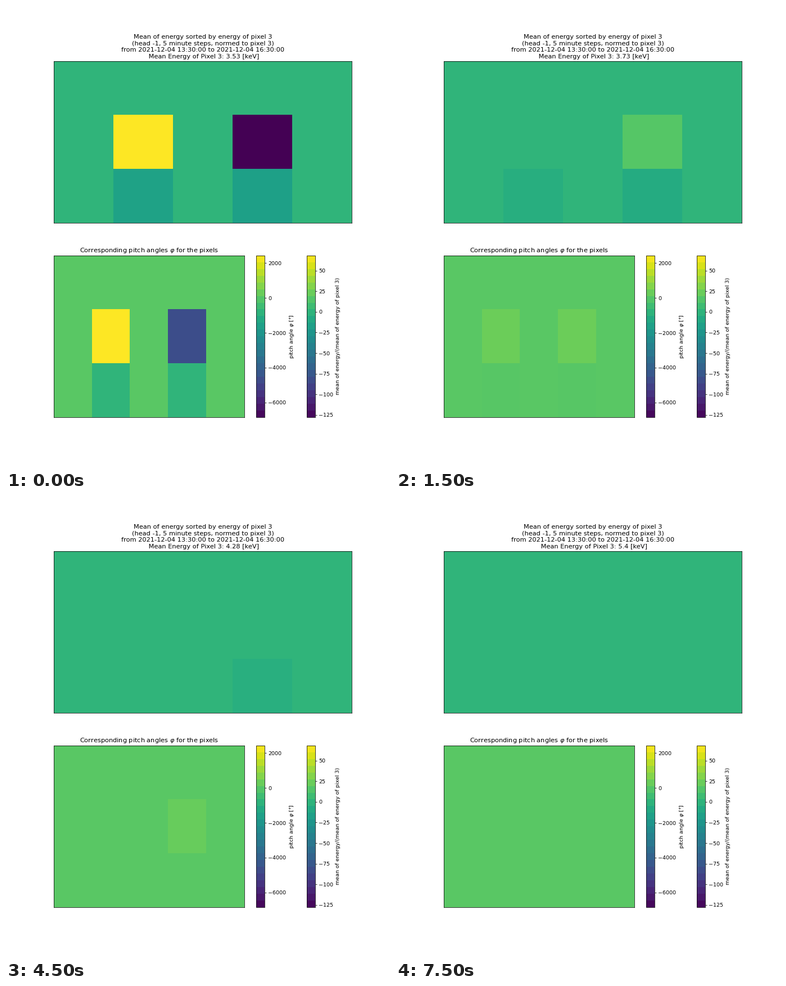
Animation, 683 px wide and 820 px high, one loop 8000 ms. Source, as a matplotlib script:

```python
import numpy as np
import matplotlib.pyplot as plt
from matplotlib.animation import FuncAnimation
from matplotlib.cm import ScalarMappable
from matplotlib.colors import ListedColormap, Normalize

plt.rcParams["font.family"] = "DejaVu Sans"

DPI = 68.3
BANDS = 24
STEP_MS = 500
ENERGY_BASE, PITCH_BASE = 0.656, 0.743

# Mean energy in keV, one value per step
ENERGIES = [3.53, 3.54, 3.58, 3.73, 4.25, 4.25, 4.27, 4.27,
            4.27, 4.28, 4.63, 4.97, 5.02, 5.04, 5.21, 5.4]

# Position on the colour scale: middle left, middle right, bottom left, bottom right
ENERGY_CELLS = [
    (1.0, 0.0, 0.575, 0.568),
    (0.656, 0.705, 0.615, 0.610),
    (0.902, 0.940, 0.580, 0.576),
    (0.656, 0.735, 0.628, 0.617),
    (0.656, 0.727, 0.640, 0.625),
    (0.656, 0.656, 0.656, 0.632),
]
PITCH_CELLS = [
    (1.0, 0.237, 0.655, 0.655),
    (0.780, 0.780, 0.740, 0.740),
    (0.935, 0.960, 0.655, 0.655),
    (0.775, 0.777, 0.740, 0.740),
    (0.765, 0.772, 0.743, 0.743),
    (0.743, 0.767, 0.743, 0.743),
]


def grid(base, cells):
    data = np.full((3, 5), base)
    data[1, [1, 3]] = cells[:2]
    data[2, [1, 3]] = cells[2:]
    return data


def energy_grid(step):
    if step > 9:
        return grid(ENERGY_BASE, (ENERGY_BASE,) * 4)
    return grid(ENERGY_BASE, ENERGY_CELLS[min(step, 5)])


def pitch_grid(step):
    cells = PITCH_CELLS[min(step, 5)]
    if step > 9:
        right = 0.760 if step < 14 else PITCH_BASE
        cells = (PITCH_BASE, right, PITCH_BASE, PITCH_BASE)
    return grid(PITCH_BASE, cells)


def heading(step):
    return ("Mean of energy sorted by energy of pixel 3\n"
            "(head -1, 5 minute steps, normed to pixel 3)\n"
            "from 2021-12-04 13:30:00 to 2021-12-04 16:30:00\n"
            f" Mean Energy of Pixel 3: {ENERGIES[step]} [keV]")


def heatmap(ax, data):
    ax.set_xticks([])
    ax.set_yticks([])
    return ax.imshow(data, cmap="viridis", vmin=0, vmax=1,
                     aspect="auto", interpolation="nearest")


def add_colorbar(ax, low, high, ticks, label):
    shades = plt.get_cmap("viridis")((np.arange(BANDS) + 0.5) / BANDS)
    scale = ScalarMappable(Normalize(low, high), ListedColormap(shades))
    fig.colorbar(scale, ax=ax, ticks=ticks, label=label)


# The small margin guards against rounding down the figure size
fig, (top, bottom) = plt.subplots(
    2, 1, figsize=(683.01 / DPI, 820.01 / DPI), dpi=DPI, facecolor="white")
energy_map = heatmap(top, energy_grid(0))
pitch_map = heatmap(bottom, pitch_grid(0))
title = top.set_title(heading(0))
bottom.set_title(r"Corresponding pitch angles $\varphi$ for the pixels")
add_colorbar(bottom, -127.7, 68.4, range(-125, 51, 25),
             "mean of energy/(mean of energy of pixel 3)")
add_colorbar(bottom, -6840, 2436, range(-6000, 2001, 2000),
             r"pitch angle $\varphi$ [°]")


def update(step):
    energy_map.set_data(energy_grid(step))
    pitch_map.set_data(pitch_grid(step))
    title.set_text(heading(step))
    return energy_map, pitch_map, title


animation = FuncAnimation(fig, update, frames=len(ENERGIES), interval=STEP_MS,
                          repeat=True, repeat_delay=0, blit=False)
plt.show()
```
